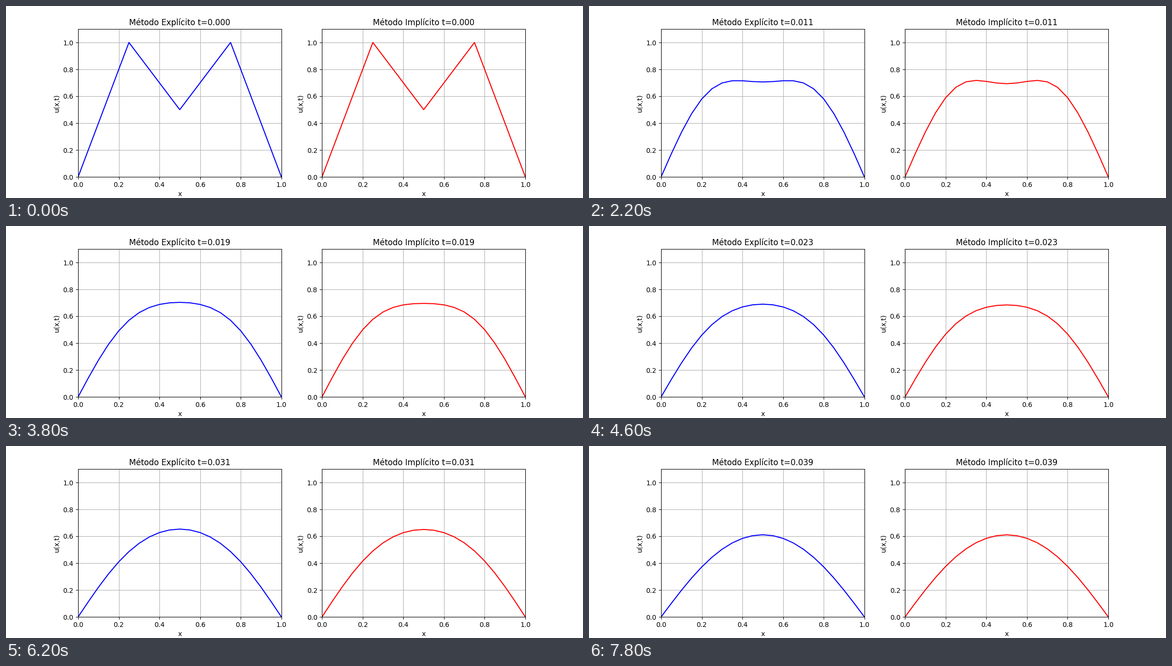
Recreate the animation shown at these times as a matplotlib script. Size 1200 px wide and 400 px high, loop 8 s.

```python
import numpy as np
import matplotlib.pyplot as plt
from matplotlib.animation import FuncAnimation

plt.rcParams["font.family"] = "DejaVu Sans"

NX, DT, STEPS = 21, 0.001, 40
x = np.linspace(0, 1, NX)
r = DT / (x[1] - x[0]) ** 2

# Second difference on the inner nodes; both ends are held at zero
n = NX - 2
lap = np.eye(n, k=1) - 2 * np.eye(n) + np.eye(n, k=-1)
forward = np.eye(n) + r * lap
backward = np.linalg.inv(np.eye(n) - r * lap)


def solve(step):
    """Solution of the heat equation at every time step."""
    u = np.zeros((STEPS, NX))
    u[0] = np.interp(x, [0, 0.25, 0.5, 0.75, 1], [0, 1, 0.5, 1, 0])
    for k in range(1, STEPS):
        u[k, 1:-1] = step @ u[k - 1, 1:-1]
    return u


fig, axes = plt.subplots(1, 2, figsize=(12, 4), dpi=100)
panels = []
for ax, name, color, step in zip(axes, ("Explícito", "Implícito"),
                                 ("blue", "red"), (forward, backward)):
    u = solve(step)
    line, = ax.plot(x, u[0], color=color)
    ax.set(xlim=(0, 1), ylim=(0, 1.1), xlabel="x", ylabel="u(x,t)")
    ax.grid(True)
    panels.append((ax, name, line, u))


def update(k):
    for ax, name, line, u in panels:
        line.set_ydata(u[k])
        ax.set_title(f"Método {name} t={k * DT:.3f}")
    return [p[2] for p in panels]


anim = FuncAnimation(fig, update, frames=STEPS, interval=200,
                     init_func=lambda: update(0), repeat=True, blit=False)
plt.show()
```
